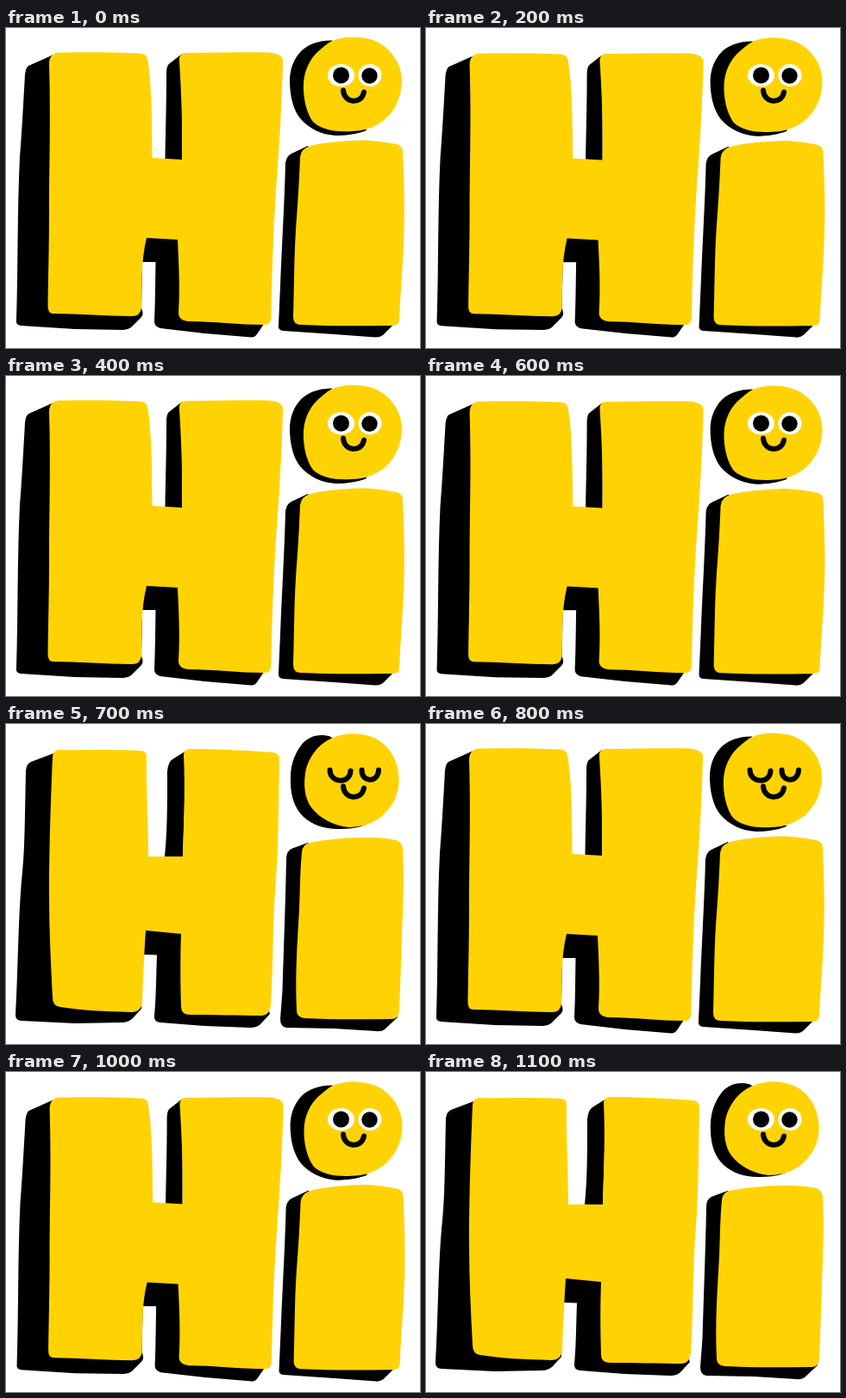
Write an HTML page that moves like this. It is 480x372 px and loops after 1200 ms.

```html
<!DOCTYPE html>
<html lang="en">
<head>
<meta charset="utf-8">
<title>Hi</title>
<style>
html, body { margin: 0; width: 100%; height: 100%; overflow: hidden; background: #fff; }
svg { display: block; width: 480px; height: 372px; }
.fill { fill: #ffd303; }
.line { fill: none; stroke: #000; stroke-width: 6; stroke-linecap: round; }

/* Hand-drawn wobble: wide, tight, wide nudged, tight */
.wide, .tight, .nudge, .open, .closed { animation: 1200ms step-end infinite; }
.wide { animation-name: wide; animation-duration: 400ms; }
.nudge { animation-name: nudge; animation-duration: 400ms; }
.tight { animation-name: tight; animation-duration: 200ms; }
.open { animation-name: open; }
.closed { animation-name: closed; }
@keyframes wide { 0% { visibility: visible } 25%, 100% { visibility: hidden } }
@keyframes nudge { 0% { visibility: hidden } 50% { visibility: visible } 75%, 100% { visibility: hidden } }
@keyframes tight { 0% { visibility: hidden } 50%, 100% { visibility: visible } }
@keyframes open { 0% { visibility: visible } 58.3333% { visibility: hidden } 75%, 100% { visibility: visible } }
@keyframes closed { 0% { visibility: hidden } 58.3333% { visibility: visible } 75%, 100% { visibility: hidden } }
</style>
</head>
<body>
<svg viewBox="0 0 480 372" role="img" aria-label="Hi">
  <defs>
    <g id="wide">
      <!-- shadows -->
      <path d="M55 31L26 44Q23 46 22 54C20 90 18 125 16 150C13 210 14 280 12 340Q11 345 17 346L80 350L136 351Q141 351 145 348L157 336Q160 332 157 326L158 272H173.500C173 300 173 320 172 341Q172 347 179 349L230 355L284 359.500Q288 360 291 356L299 344L250 200L204 152V30L190 41Q186 43 186 53C186 90 185 120 184.500 153L165 180L100 100Z"/>
      <path d="M350 137L331 146Q325 149 324 157C323 200 320 250 318 300L316 345Q315 351 321 352L380 356L428 359.500Q433 360 437 357L449 345L400 200Z"/>
      <path d="M378 14.500C365 14 352 18 343 26C333 36 329 49 329 61C329 79 333 95 341 105C351 117 366 124 382 125C395 125 408 123 418 119L400 60Z"/>
      <!-- fronts -->
      <g class="fill">
        <path d="M62 28.500C90 28 125 28 155 29.500Q163 30 164 36C168 58 169.500 95 169.500 151L204 153C205 115 203 70 201 39Q200 29 208 29C240 29 275 28 305 28.500Q321 30 321 38C320 90 316 150 313 190C310 235 308 290 307.500 336Q307 345 300 345C270 345 240 341 212 341Q200 340 200 331C202 300 200 270 199 246L163 244C156 272 158 300 157 325Q156 335 146 335C115 335 85 332 55 332Q48 332 48.500 322C49 285 50 250 50 215C50 160 52 110 50 42Q50 29 62 28.500Z"/>
        <path d="M353 137C370 133 390 131 410 130.500C425 130 440 133 453 135Q460 137 460 144C461 170 463 210 461 250C460 280 457 310 456 339Q456 346 448 346C415 346 380 347 342 345Q333 345 333 336C334 305 334 265 336 235C339 195 340 175 341 150Q342 140 353 137Z"/>
        <path d="M378 15C390 9.500 408 9 422 13C435 16 447 27 453 38C458 48 460 58 458.500 68C457 84 449 99 437 108C426 116 414 120 400 120C384 121 366 119 356 109C349 100 344 82 345 64C346 49 352 37 361 28C367 23 372 18 378 15Z"/>
      </g>
    </g>
    <g id="tight">
      <path d="M58 33L29 44Q24 46 23 54C22 100 22 145 19 172C14 220 14 290 11 338Q11 345 18 345L80 348L134 347Q142 347 147 342L157 331L159 268L175 268.500C174 295 174 320 172 339Q171 346 179 347L230 351L283 353Q291 353 295 349L306 337L250 200L205 154L209 31L193 41Q188 44 187 55C187 95 187 125 184 154L160 180L100 100Z"/>
      <path d="M350 138L331 145Q325 148 325 157C324 210 322 260 320.500 310L318 343Q318 352 325 353L380 354L429 357Q435 358 439 355L454 341L400 200Z"/>
      <path d="M377 15C363 10 349 15 342 25C333 37 329 51 330 68C330 84 335 99 345 108C355 117 369 122 384 122C398 122 408 121 417 117L400 60Z"/>
      <g class="fill">
        <path d="M62 30C94 31 125 29 156 31Q163 31 163 38C162 70 165 110 165 154L205 154C206 115 208 75 206 36Q206 29 214 29C246 29 280 31 310 33Q317 34 317 42C316 85 316 145 313 180C309 225 310 280 307 327Q305 339 297 339C270 339 240 338 214 338Q203 338 203 329C202 300 202 270 203 244L162 240C160 270 159 295 158 323Q157 335 145 335C115 334 88 333 63 329Q54 328 54 318C52 280 50 240 50 200C50 145 52 85 54 38Q55 30 62 30Z"/>
        <path d="M353 138C376 133 400 132 421 132C432 132 443 133 452 135Q460 137 460 147C462 180 460 215 459 250C458 280 457 305 456 334Q455 343 447 343C414 343 380 344 346 342Q337 341 337 333C335 290 338 250 340 215C341 190 341 170 343 149Q344 139 353 138Z"/>
        <path d="M379 16C393 10 410 10 424 15C441 21 453 38 455 57C458 78 450 94 437 106C427 115 413 120 397 120C379 118 363 109 354 97C346 86 345 71 347 57C350 39 363 22 379 16Z"/>
      </g>
    </g>
  </defs>

  <use href="#wide" class="wide"/>
  <use href="#wide" class="nudge" transform="translate(.6 1) scale(1 .9975)"/>
  <use href="#tight" class="tight"/>

  <g class="open">
    <g fill="#fff">
      <ellipse cx="388.500" cy="55" rx="15.500" ry="13"/>
      <ellipse cx="422" cy="55" rx="13.500" ry="13"/>
    </g>
    <circle cx="388.500" cy="55" r="9.500"/>
    <circle cx="421.500" cy="55.500" r="9.200"/>
  </g>
  <g class="line">
    <g class="closed">
      <path d="M375.500 53.500C375.500 69 399 70 399.500 54.500"/>
      <path d="M412.500 53.500C412 68 431.500 69 432 53.500"/>
    </g>
    <path d="M391 72.500C392 88 412.500 89 415 74.500"/>
  </g>
</svg>
</body>
</html>
```
